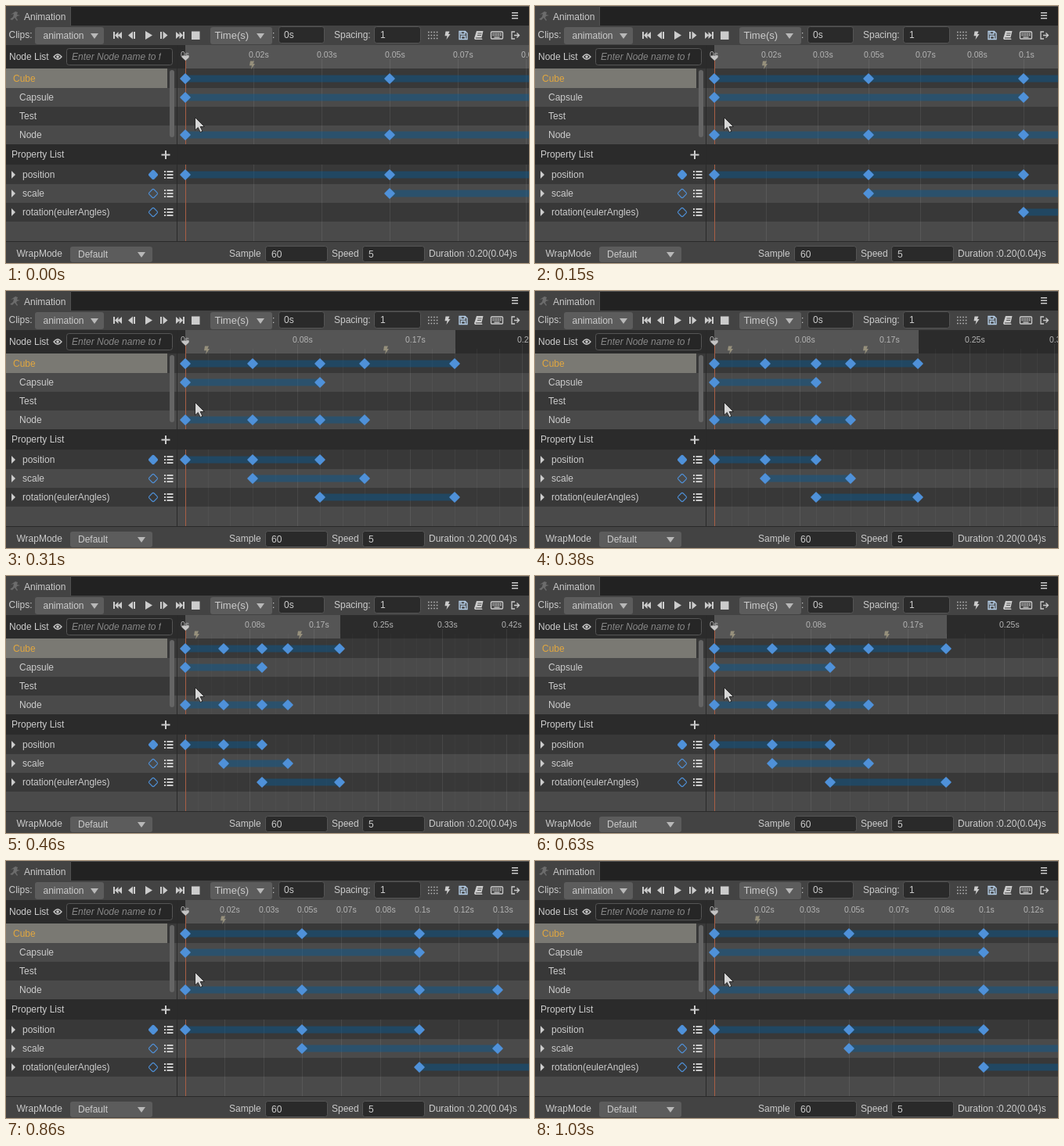
An HTML page for the animation above (1.09 s loop, 668x329 px).

```html
<!DOCTYPE html>
<html lang="en">
<head>
<meta charset="utf-8">
<title>Animation timeline</title>
<style>
  html, body { margin: 0; width: 100%; height: 100%; overflow: hidden; background: #434343; }
  svg { display: block; width: 668px; height: 329px; }
  text { font: 12px "Liberation Sans", Arial, sans-serif; fill: #ccc; white-space: pre; }
  .dark { fill: #2b2b2b; }
  .even { fill: #383838; }
  .odd { fill: #4a4a4a; }
  .field { fill: #2a2a2a; stroke: #555; }
  .drop { fill: #5c5c5c; }
  .arrow { fill: #b8b8b8; }
  .icon { fill: #ccc; }
  .line { fill: none; stroke: #ccc; stroke-width: 1.3; }
  .key { fill: #4f91d9; stroke: #4f91d9; stroke-width: 1.6; stroke-linejoin: round; }
  .small { stroke-width: 1.1; }
  .hollow { fill: none; }
  .bar { fill: #005b9c; opacity: .42; }
  .label { font-size: 10.5px; fill: #b4b4b4; }
  .event { fill: #96907c; }
</style>
</head>
<body>
<svg viewBox="0 0 668 329">
  <defs>
    <path id="key" class="key" d="M0-6 6 0 0 6-6 0Z"/>
    <path id="small" d="M-1.200-5Q0-6.200 1.200-5L5-1.200Q6.200 0 5 1.200L1.200 5Q0 6.200-1.200 5L-5 1.200Q-6.200 0-5-1.200Z"/>
    <path id="bolt" d="M-2.500-5H2.500L1-1.500H3.500L-1.500 5.500-.5.8H-3.500Z"/>
    <path id="down" class="arrow" d="M-5-3H5L0 4Z"/>
    <path id="fold" class="icon" d="M0-5 5 0 0 5Z"/>
    <path id="list" class="icon" d="M0-5h2v2H0zM0-1h2v2H0zM0 3h2v2H0zM3.500-5h8v2h-8zM3.500-1h8v2h-8zM3.500 3h8v2h-8z"/>
    <clipPath id="hint"><rect x="78" y="54" width="120" height="22"/></clipPath>
    <clipPath id="stage"><rect x="219" y="50" width="449" height="252"/></clipPath>
  </defs>

  <!-- tab strip and toolbar -->
  <rect width="668" height="329" fill="#434343"/>
  <rect x="82" width="586" height="25" fill="#222"/>
  <path d="M82.500 25V.5H668" fill="none" stroke="#505050"/>
  <path d="M12 7l3 1-1 3 4 1-4 1-1 2 2 3-1 1-3-4-3 3-3-1 4-3 1-4-4 1Z" fill="#6c6c6c"/>
  <text x="23" y="18">Animation</text>
  <path class="icon" d="M646 8h8v1.500h-8zM646 11.500h8V13h-8zM646 15h8v1.500h-8z"/>

  <text x="3.500" y="41">Clips:</text>
  <rect class="drop" x="37" y="27" width="88" height="22" rx="3"/>
  <text x="47.500" y="42">animation</text>
  <use href="#down" x="113" y="38"/>
  <g class="icon">
    <path d="M137 33h2v9h-2zM143.500 33v9l-4.500-4.500zM148 33v9l-5-4.500z"/>
    <path d="M162 32.500v10l-6-5zM163 33h2v9h-2z"/>
    <path d="M178 32l9 5.500-9 5.500z"/>
    <path d="M197 33h2v9h-2zM200.500 32.500l6 5-6 5z"/>
    <path d="M217 33l5 4.500-5 4.500zM221.500 33l4.500 4.500-4.500 4.500zM226 33h2v9h-2z"/>
    <path d="M237 32.500h10.500v10.500H237z"/>
  </g>
  <rect class="drop" x="261" y="27" width="79" height="22" rx="3"/>
  <text x="266.500" y="42" style="font-size:13px">Time(s)</text>
  <use href="#down" x="325" y="38"/>
  <text x="340" y="41">:</text>
  <rect class="field" x="348.500" y="26.500" width="58" height="21" rx="3"/>
  <text x="355" y="41">0s</text>
  <text x="419" y="41">Spacing:</text>
  <rect class="field" x="470.500" y="26.500" width="59" height="21" rx="3"/>
  <text x="478" y="41">1</text>
  <path d="M539 33.500h13M539 37.500h13M539 41.500h13" stroke="#b8b8b8" stroke-width="1.600" stroke-dasharray="1.600 2"/>
  <use href="#bolt" class="icon" x="564" y="37.500"/>
  <path d="M579 32.500h7.500l2.500 2.500v7.500h-10zM581 32.500v3.500h5v-3.500M581.500 42v-3.500h5V42" fill="none" stroke="#b4cde6" stroke-width="1.400"/>
  <path class="icon" d="M601 32h8.500l-2 8.500h-7.500v1h8l.500 1.500h-9.500l-1-1.500z"/>
  <path d="M602.500 35h5M602 37.500h5" stroke="#555"/>
  <rect class="line" x="619.500" y="33" width="15" height="9" rx="1"/>
  <path class="line" d="M621.500 35.500h11M621.500 37.500h11" stroke-dasharray="1.400 1"/>
  <path class="line" d="M623.500 40h7"/>
  <path class="line" d="M650 33h-4v9h4M649 37.500h6M652.500 34.500l3 3-3 3"/>

  <!-- node list -->
  <rect class="dark" y="50" width="668" height="30"/>
  <text x="4" y="69">Node List</text>
  <path class="line" d="M61 65q5-6.500 10 0-5 6.500-10 0z"/>
  <circle class="icon" cx="66" cy="65" r="1.800"/>
  <rect x="77.500" y="54.500" width="135" height="21" rx="3" fill="#262626" stroke="#555"/>
  <text x="84" y="69" clip-path="url(#hint)" style="font-style:italic;fill:#888">Enter Node name to filter</text>

  <rect class="even" y="80" width="668" height="25"/>
  <rect class="odd" y="105" width="668" height="24"/>
  <rect class="even" y="129" width="668" height="24"/>
  <rect class="odd" y="153" width="668" height="24"/>
  <rect y="80" width="206" height="25" fill="#7a7973"/>
  <text x="9" y="97" style="fill:#e2a73f">Cube</text>
  <text x="17" y="121">Capsule</text>
  <text x="17" y="145">Test</text>
  <text x="17" y="169">Node</text>
  <rect x="209" y="82" width="6" height="86" rx="3" fill="#656565"/>

  <!-- property list -->
  <rect class="even" y="203" width="668" height="25"/>
  <rect class="odd" y="228" width="668" height="24"/>
  <rect class="even" y="252" width="668" height="24"/>
  <rect class="odd" y="276" width="668" height="26"/>
  <use href="#fold" x="7" y="216"/><text x="21" y="220">position</text>
  <use href="#fold" x="7" y="240"/><text x="21" y="244">scale</text>
  <use href="#fold" x="7" y="264"/><text x="21" y="268">rotation(eulerAngles)</text>
  <use href="#small" class="key small" x="188" y="216"/>
  <use href="#small" class="key small hollow" x="188" y="240"/>
  <use href="#small" class="key small hollow" x="188" y="264"/>
  <use href="#list" x="202" y="216"/>
  <use href="#list" x="202" y="240"/>
  <use href="#list" x="202" y="264"/>

  <!-- timeline -->
  <g clip-path="url(#stage)">
    <g id="grid"></g>
    <path d="M229.500 68V302" stroke="#a95f45"/>
    <rect class="dark" x="219" y="177" width="449" height="26"/>
    <g id="tracks"></g>
    <path d="M225 63.500h8.500v2.500l-4.250 4-4.250-4z" fill="#c4c4c4"/>
  </g>
  <rect class="dark" y="177" width="219" height="26"/>
  <text x="7" y="194">Property List</text>
  <path d="M198.500 190.500h11M204 185v11" stroke="#ccc" stroke-width="2"/>
  <rect x="218" y="50" width="1" height="252" fill="#2a2a2a"/>

  <!-- footer -->
  <rect y="301" width="668" height="28" fill="#434343"/>
  <rect y="301" width="668" height="1" fill="#2a2a2a"/>
  <text x="13.500" y="321">WrapMode</text>
  <rect class="drop" x="82" y="308" width="105" height="20" rx="3"/>
  <text x="92" y="322">Default</text>
  <use href="#down" x="173" y="318"/>
  <text x="285" y="321">Sample</text>
  <rect class="field" x="331.500" y="307.500" width="79" height="20" rx="3"/>
  <text x="339" y="322">60</text>
  <text x="416" y="321">Speed</text>
  <rect class="field" x="455.500" y="307.500" width="79" height="20" rx="3"/>
  <text x="463" y="322">5</text>
  <text x="540" y="321">Duration :0.20(0.04)s</text>

  <path d="M241.500 142.500v16.500l3.800-3.500 2.900 6 2.800-1.200-2.800-5.800h5.300z" fill="#d6d6d6" stroke="#2a2a2a"/>
</svg>

<script>
  const LOOP = 1090, LEFT = 229, RIGHT = 668, RATE = 60, END = 12;

  // [start ms, pixels per sample]
  const zooms = [
    [0, 87], [150, 65.8], [230, 45], [310, 28.65], [380, 21.7], [460, 16.4],
    [630, 24.65], [700, 32.9], [780, 41.3], [860, 49.82], [1030, 57.3]
  ];

  // row centre y and the samples that hold keys
  const tracks = [
    [93, [0, 3, 6, 8, 12]], [117, [0, 6]], [165, [0, 3, 6, 8]],
    [216, [0, 3, 6]], [240, [3, 8]], [264, [6, 12]]
  ];
  const events = [1, 9];

  const grid = document.getElementById('grid');
  const rows = document.getElementById('tracks');

  const rect = (x, y, w, h, attrs) =>
    `<rect x="${x}" y="${y}" width="${w}" height="${h}" ${attrs}/>`;

  const timeLabel = n => n ? `${+(n / RATE).toFixed(2)}s` : '0s';

  function drawGrid(px, at) {
    const step = px > 46 ? 1 : 5;
    const faint = Math.min(0.07, px / 650);
    let out = rect(LEFT, 50, Math.min(at(END) + 1, RIGHT) - LEFT, 30, 'fill="#555"');
    for (let n = 1; at(n) < RIGHT; n++) {
      const major = n % step === 0;
      const top = major ? 68 : 74;
      out += rect(at(n), top, 1, 302 - top, `fill="#fff" opacity="${major ? 0.08 : faint}"`);
    }
    for (let n = 0; at(n) - 6 < RIGHT; n += step)
      out += `<text class="label" x="${at(n) - 6}" y="66">${timeLabel(n)}</text>`;
    for (const n of events)
      out += `<use href="#bolt" class="event" x="${at(n) - 1.5}" y="75.5"/>`;
    grid.innerHTML = out;
  }

  function drawTracks(at) {
    rows.innerHTML = tracks.map(([y, keys]) => {
      const x = at(keys[0]);
      return rect(x, y - 4.5, at(keys[keys.length - 1]) - x, 9, 'class="bar"') +
        keys.map(n => `<use href="#key" x="${at(n)}" y="${y}"/>`).join('');
    }).join('');
  }

  let shown;
  function tick() {
    const t = performance.now() % LOOP;
    const px = zooms.filter(z => z[0] <= t).pop()[1];
    if (px !== shown) {
      const at = n => Math.round(LEFT + n * px);
      drawGrid(px, at);
      drawTracks(at);
      shown = px;
    }
    requestAnimationFrame(tick);
  }
  tick();
</script>
</body>
</html>
```
